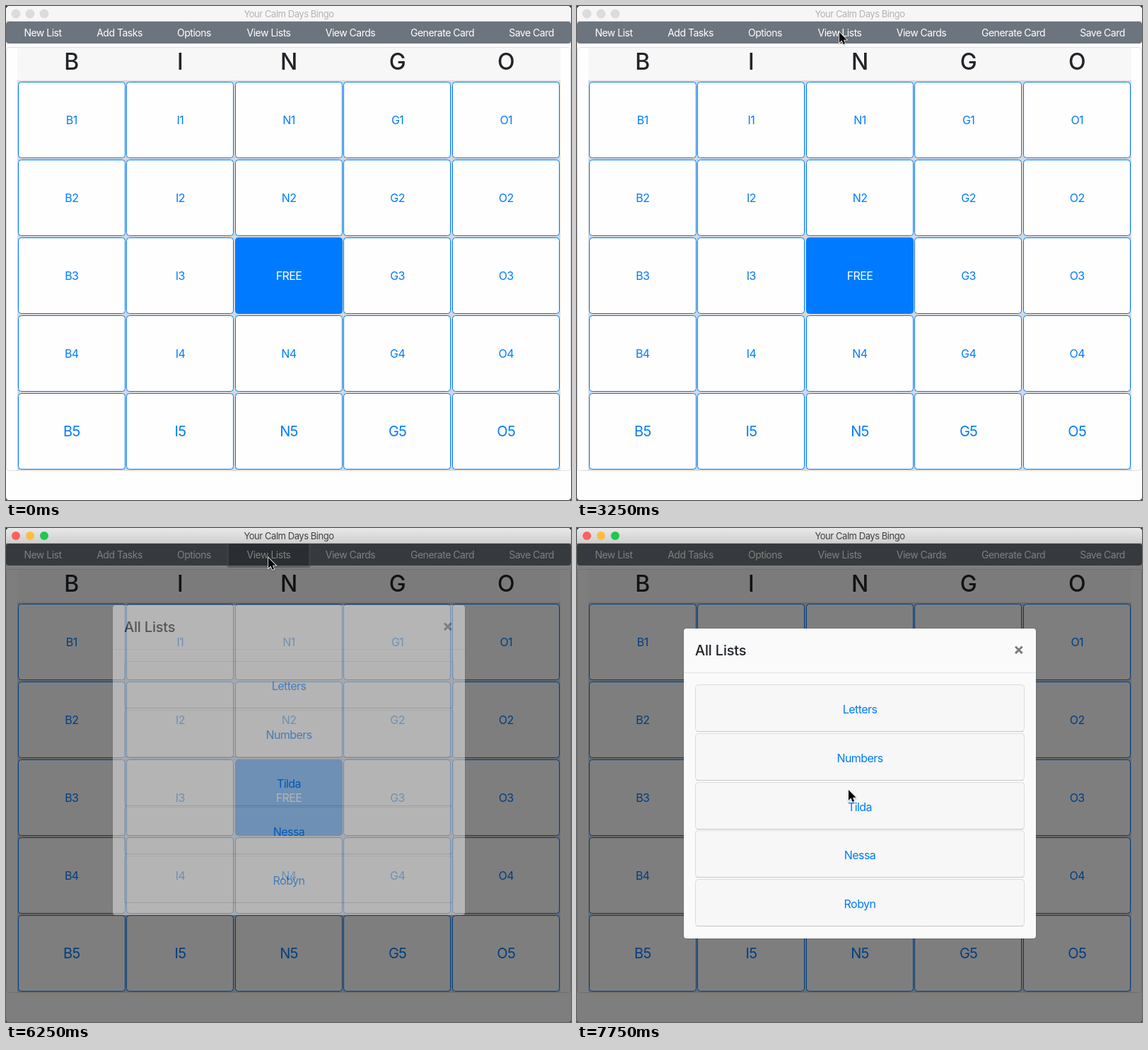
Animation, 799 px wide and 698 px high, one loop 8000 ms. Source, as an HTML page:

```html
<!DOCTYPE html>
<html lang="en">
<head>
<meta charset="utf-8">
<title>Bingo</title>
<style>
html, body { margin: 0; width: 100%; height: 100%; overflow: hidden; background: #16323c; }
svg { display: block; width: 799px; height: 698px; border-radius: 5px 5px 4px 4px; background: #fefefe; }
text { font: 16px Inter, sans-serif; letter-spacing: -.035em; text-anchor: middle; fill: #007bff; }
.bar { font-size: 13px; }
.nav text { font-size: 14px; fill: #fff; }
.head text { font-size: 32px; font-weight: 500; letter-spacing: 0; fill: #212529; }
.big { font-size: 20px; }
.cell { fill: #fefefe; stroke: #007bff; }
.free { fill: #007bff; }
text.on { fill: #fff; }
.title { font-size: 20px; font-weight: 500; letter-spacing: -.01em; text-anchor: start; fill: #212529; }
.card { fill: #f7f7f7; stroke: #dcdcdc; }

.active, .hover, .shade, .modal, .cursor, .letters, .numbers { animation: 8s step-end infinite; }
.active { animation-name: active; }
.hover { animation-name: hover; }
.shade { animation-name: shade; }
.modal { animation-name: modal; }
.letters { animation-name: letters; }
.numbers { animation-name: numbers; }
.cursor { animation-name: cursor; filter: drop-shadow(0 1px 1px rgba(0, 0, 0, .3)); }

@keyframes active { 0% { opacity: 0 } 75%, 100% { opacity: 1 } }
@keyframes hover { 0% { opacity: 0 } 75% { opacity: 1 } 84.375%, 100% { opacity: 0 } }
@keyframes shade { 0% { opacity: 0 } 78.125%, 100% { opacity: .5 } }
@keyframes modal {
  0% { opacity: 0; transform: translateY(-50px) }
  78.125% { opacity: .45; transform: translateY(-33px) }
  81.25%, 100% { opacity: 1; transform: none }
}
@keyframes letters {
  0%, 90.625%, 100% { fill: #007bff; text-decoration-line: none }
  87.5% { fill: #0056b3; text-decoration-line: underline }
}
@keyframes numbers {
  0%, 96.875%, 100% { fill: #007bff; text-decoration-line: none }
  93.75% { fill: #0056b3; text-decoration-line: underline }
}
@keyframes cursor {
  0% { opacity: 0; transform: translate(593px, 44px) }
  3.125% { opacity: 1; transform: translate(593px, 44px) }
  6.25% { transform: translate(570px, 69px) }
  9.375% { transform: translate(537px, 64px) }
  12.5% { transform: translate(517px, 63px) }
  15.625% { transform: translate(421px, 55px) }
  18.75% { transform: translate(391px, 27px) }
  21.875% { transform: translate(459px, 38px) }
  25% { transform: translate(461px, 40px) }
  34.375% { transform: translate(456px, 38px) }
  37.5% { transform: translate(391px, 29px) }
  40.625% { transform: translate(371px, 37px) }
  50% { transform: translate(370px, 41px) }
  53.125% { transform: translate(367px, 42px) }
  56.25% { transform: translate(368px, 44px) }
  75% { transform: translate(371px, 42px) }
  84.375% { transform: translate(359px, 160px) }
  87.5% { transform: translate(380px, 278px) }
  90.625% { transform: translate(381px, 290px) }
  93.75% { transform: translate(383px, 328px) }
  96.875%, 100% { opacity: 1; transform: translate(384px, 370px) }
}
</style>
</head>
<body>
<svg viewBox="0 0 799 698">
  <defs>
    <linearGradient id="metal" x2="0" y2="1">
      <stop stop-color="#e8e8e8"/><stop offset="1" stop-color="#cfcfcf"/>
    </linearGradient>
  </defs>

  <rect y="22" width="799" height="31" rx="4" fill="#6c757d"/>
  <g class="hover">
    <path d="M312 22H431V52a4 4 0 0 1-4 4H316a4 4 0 0 1-4-4Z" fill="#828a91" opacity=".5"/>
    <path d="M315 22H428V53H315Z" fill="#545b62"/>
  </g>
  <g class="nav" id="nav"></g>

  <rect x=".5" y="58.5" width="798" height="598" rx="4" fill="none" stroke="#dfdfdf"/>
  <rect x="16" y="59" width="768" height="47" fill="#f7f7f7"/>
  <rect x="16" y="105" width="768" height="551" fill="#d6d8da"/>
  <g class="head" id="head"></g>
  <g id="cells"></g>

  <rect class="shade" y="22" width="799" height="676"/>

  <g class="modal">
    <rect x="150.5" y="141.5" width="499" height="439" rx="4.5" fill="#000" opacity=".25"/>
    <rect x="151" y="142" width="498" height="438" rx="4" fill="#fafafa"/>
    <path d="M151 204.5H649" stroke="#e2e4e6"/>
    <text class="title" x="167" y="180">All Lists</text>
    <path d="M620 167.5l9.6 9.6m0-9.6l-9.6 9.6" stroke="#7d7d7d" stroke-width="2.9"/>
    <g id="lists"></g>
  </g>

  <rect width="799" height="22" fill="#f6f6f6"/>
  <path d="M0 21.5H799" stroke="#dadada"/>
  <g fill="#dcdcdc" stroke="#d0d0d0" stroke-width=".6">
    <circle cx="14" cy="11" r="6"/><circle cx="34" cy="11" r="6"/><circle cx="54" cy="11" r="6"/>
  </g>
  <text class="bar" x="400" y="16" style="fill:#b3b3b3">Your Calm Days Bingo</text>
  <g class="active">
    <rect width="799" height="22" fill="url(#metal)"/>
    <path d="M0 21.5H799" stroke="#b4b4b4"/>
    <circle cx="14" cy="11" r="6" fill="#fc605c"/>
    <circle cx="34" cy="11" r="6" fill="#fdbc40"/>
    <circle cx="54" cy="11" r="6" fill="#1fc84c"/>
    <text class="bar" x="400" y="16" style="fill:#404040">Your Calm Days Bingo</text>
  </g>

  <path class="cursor" d="M0 0V14.8L3.4 11.6L5.7 17L8.1 16L5.9 10.8H10.6Z" stroke="#fff" stroke-width="1.6" paint-order="stroke"/>
</svg>
<script>
const text = (x, y, label, cls = '') => `<text class="${cls}" x="${x}" y="${y}">${label}</text>`;
const fill = (id, parts) => document.getElementById(id).innerHTML = parts.join('');

const menu = [['New List', 52], ['Add Tasks', 160.5], ['Options', 266], ['View Lists', 371.5],
  ['View Cards', 487], ['Generate Card', 617], ['Save Card', 743]];
fill('nav', menu.map(([label, x]) => text(x, 43, label)));

const letters = [...'BINGO'];
const colX = c => 17 + Math.round(c * 153.5 - .1);
const midX = c => 92.8 + c * 153.6;
fill('head', letters.map((ch, c) => text(midX(c), 90, ch)));

const cells = [];
for (let r = 0; r < 5; r++) {
  letters.forEach((ch, c) => {
    const free = r === 2 && c === 2, last = r === 4;
    cells.push(`<rect class="cell ${free ? 'free' : ''}" x="${colX(c) + .5}" y="${107.5 + r * 110}" width="151" height="107" rx="4"/>`,
      text(midX(c), (last ? 168 : 167) + r * 110, free ? 'FREE' : ch + (r + 1), free ? 'on' : last ? 'big' : ''));
  });
}
fill('cells', cells);

const lists = ['Letters', 'Numbers', 'Tilda', 'Nessa', 'Robyn'];
fill('lists', lists.map((name, i) => {
  const y = 221.5 + Math.round(i * 68.75);
  return `<rect class="card" x="167.5" y="${y}" width="465" height="66" rx="4"/>
    <path d="M169 ${y + 66}H631" stroke="#c6c6c6"/>` +
    text(400, y + 40.5, name, i < 2 ? name.toLowerCase() : '');
}));
</script>
</body>
</html>
```
